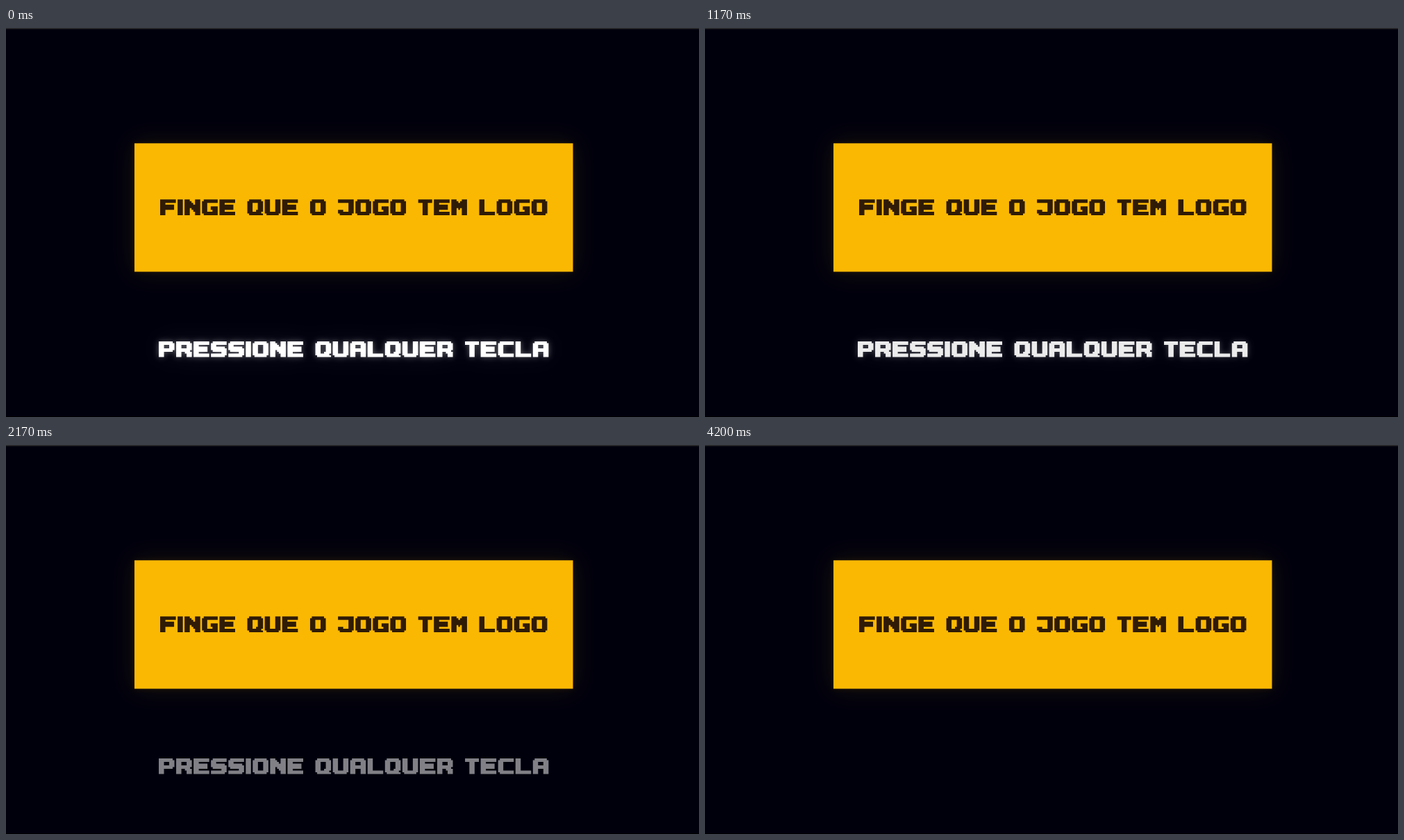
Recreate the animation shown at these times as an HTML page. Size 998 px wide and 561 px high, loop 4230 ms.

```html
<!DOCTYPE html>
<html lang="pt">
<head>
<meta charset="utf-8">
<title>Pressione qualquer tecla</title>
<style>
  html, body { margin: 0; width: 100%; height: 100%; overflow: hidden; background: #00000d; }
  svg { display: block; width: 100%; height: 100%; }
</style>
</head>
<body>
<svg viewBox="0 0 998 561" preserveAspectRatio="none">
  <defs>
    <filter id="near" filterUnits="userSpaceOnUse" x="0" y="0" width="998" height="561"><feGaussianBlur stdDeviation="4"/></filter>
    <filter id="far" filterUnits="userSpaceOnUse" x="0" y="0" width="998" height="561"><feGaussianBlur stdDeviation="18"/></filter>
    <rect id="panel" x="185" y="166.3" width="631.5" height="185.2" fill="#fbb803"/>
    <path id="prompt" fill="#fff" fill-rule="evenodd"/>
  </defs>
  <rect width="998" height="561" fill="#00000d"/>
  <rect width="998" height="1.5" fill="#2c2c2e"/>
  <rect y="560" width="998" height="1" fill="#000"/>
  <use href="#panel" filter="url(#far)" opacity=".1"/>
  <use href="#panel" filter="url(#near)" opacity=".08"/>
  <use href="#panel"/>
  <path id="title" fill="#2f1b06" fill-rule="evenodd"/>
  <g id="glow">
    <use href="#prompt" filter="url(#far)" opacity=".08"/>
    <use href="#prompt" filter="url(#near)" opacity=".36"/>
  </g>
  <use id="label" href="#prompt"/>
</svg>
<script>
// Pixel letters on a grid nine units tall: [outline, width]
const hole = 'M3 2v2h3V2z';
const wide = {
  A: 'M1 0h7v1h1v8H6V6H3v3H0V1h1z' + hole,
  C: 'M1 0h8v2H3v5h6v2H1V8H0V1h1z',
  E: 'M0 0h9v2H3v1h5v3H3v1h6v2H0z',
  F: 'M0 0h9v2H3v1h5v3H3v3H0z',
  G: 'M1 0h8v2H3v5h3V6H5V4h4v5H1V8H0V1h1z',
  J: 'M0 0h9v8H8v1H1V8H0V6h3v1h3V2H0z',
  L: 'M0 0h3v7h6v2H0z',
  M: 'M0 0h3v1h1v1h1V1h1V0h3v9H6V5H5v1H4V5H3v4H0z',
  N: 'M0 0h3v1h1v1h1v1h1V0h3v9H6V7H5V6H4V5H3v4H0z',
  O: 'M1 0h7v1h1v7H8v1H1V8H0V1h1zM3 2v5h3V2z',
  P: 'M0 0h8v1h1v4H8v1H3v3H0z' + hole,
  Q: 'M1 0h7v1h1v6H8v1h1v1H1V8H0V1h1zM3 2v5h2V6h1V2z',
  R: 'M0 0h8v1h1v4H8v1h1v3H6V7H5V6H3v3H0z' + hole,
  S: 'M1 0h8v2H3v1h5v1h1v4H8v1H0V7h6V6H1V5H0V1h1z',
  U: 'M0 0h3v7h3V0h3v8H8v1H1V8H0z'
};
const narrow = {
  I: ['M0 0h3v9H0z', 3],
  T: ['M0 0h8v2H5.5v7h-3V2H0z', 8],
  ' ': ['', 5]
};
const glyph = c => narrow[c] || [wide[c], 9];

// Moves a glyph's absolute x coordinates along the line.
const shift = (d, dx) => d.replace(/([MH])([\d.]+)/g, (_, cmd, x) => cmd + (+x + dx));

function write(id, text, x, y, unit) {
  const path = document.getElementById(id);
  let pen = 0, d = '';
  for (const c of text) {
    const [outline, width] = glyph(c);
    d += shift(outline, pen);
    pen += width + 1;
  }
  path.setAttribute('d', d);
  path.setAttribute('aria-label', text);
  path.setAttribute('transform', `translate(${x} ${y}) scale(${unit})`);
}

write('title', 'FINGE QUE O JOGO TEM LOGO', 222, 247.3, 2.511);
write('prompt', 'PRESSIONE QUALQUER TECLA', 220, 452, 2.506);

const LOOP = 4230, STEPS = 127, BLINK = 17;
// Blink curve: [step, opacity]
const curve = [[0, 1], [1, .91], [3, .69], [4, .6], [6, .24], [7, 0], [11, 0], [14, .5], [17, 1]];

function blink(step) {
  const i = curve.findIndex(([s]) => s > step);
  const [s0, v0] = curve[i - 1], [s1, v1] = curve[i];
  return v0 + (v1 - v0) * (step - s0) / (s1 - s0);
}

const label = document.getElementById('label');
const glow = document.getElementById('glow');
const start = performance.now();

function draw() {
  const t = (performance.now() - start) % LOOP;
  const step = Math.min(STEPS - 1, Math.floor(t * STEPS / LOOP + .15));
  const alpha = blink(step % BLINK);
  label.setAttribute('opacity', alpha);
  glow.setAttribute('opacity', Math.max(0, (alpha - .7) / .3));
  requestAnimationFrame(draw);
}
draw();
</script>
</body>
</html>
```
